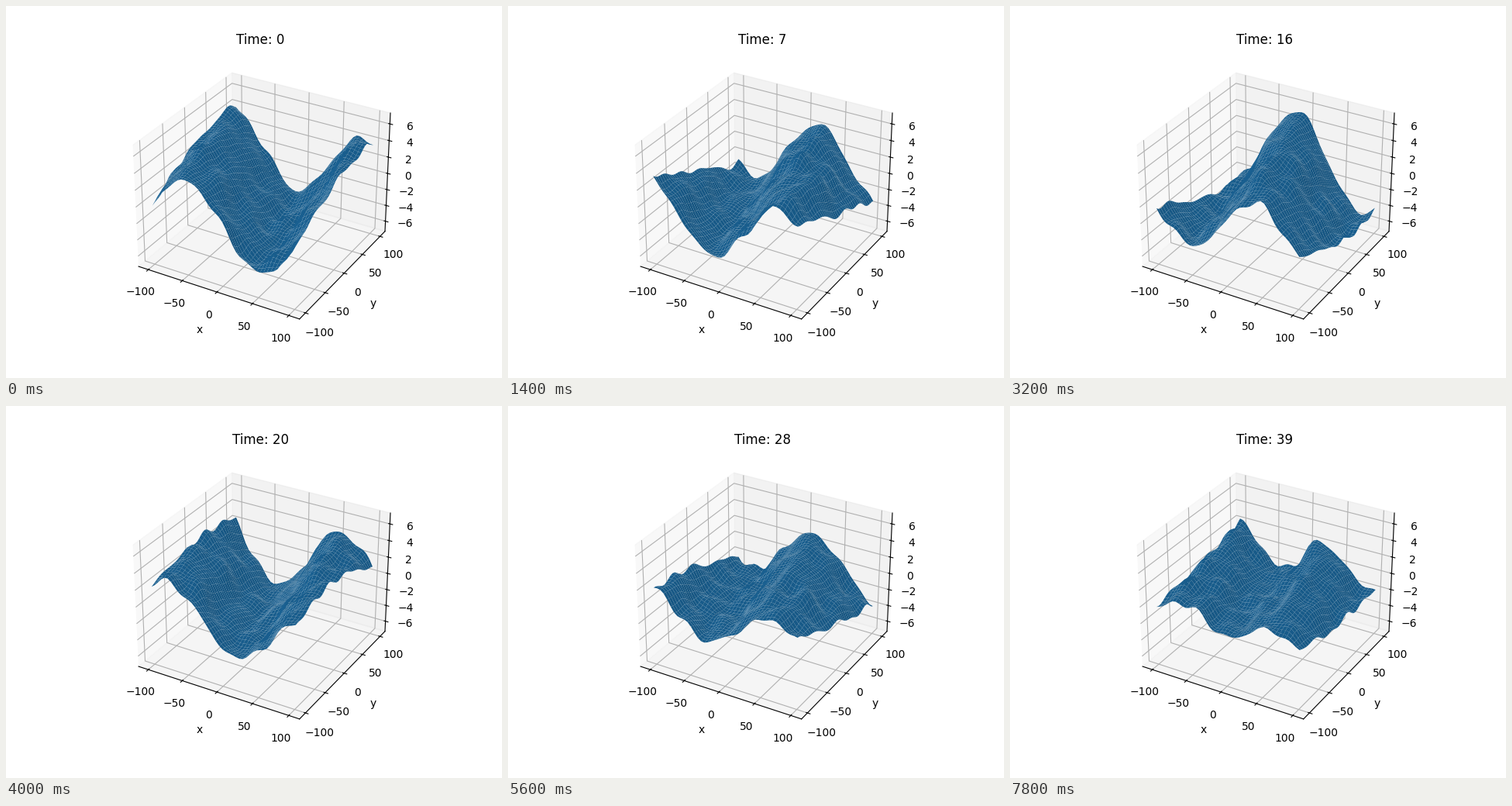
A matplotlib script for the animation above (8 s loop, 640 px wide and 480 px high).

```python
import numpy as np
import matplotlib.pyplot as plt
from matplotlib.animation import FuncAnimation

FRAMES, INTERVAL = 40, 200
SIZE = 100       # half width of the sea patch
SLANT = 0.3      # phase lag of the back edge, in turns
GRAVITY = 9.81

# Main swell: time, turns at the front edge, wavelength, front and back height
SWELL = np.array([
    (0, -.25, 198, 4.1, 4.3),
    (3, .08, 195, 3.8, 4.6),
    (10, .645, 195, 4.0, 4.0),
    (16, 1.22, 190, 3.6, 5.1),
    (24, 1.985, 188, 2.9, 3.5),
    (33, 2.84, 165, 1.7, 2.6),
    (39, 3.51, 130, 1.1, 2.2),
])

side = np.linspace(-SIZE, SIZE, 43)
X, Y = np.meshgrid(side, side)
DEPTH = (Y + SIZE) / (2 * SIZE)  # 0 at the front edge, 1 at the back

# Short waves: wave number, heading and phase
rng = np.random.default_rng(4)
ripples = list(zip(rng.uniform(.08, .2, 16),
                   rng.normal(.3, .6, 16),
                   rng.uniform(0, 2 * np.pi, 16)))


def swell(t):
    turns, length, front, back = (
        np.interp(t, SWELL[:, 0], col) for col in SWELL.T[1:])
    height = front + (back - front) * DEPTH
    return height * np.cos(2 * np.pi * (X / length - turns + SLANT * DEPTH))


def ripple(t, k, heading, phase):
    along = X * np.cos(heading) + Y * np.sin(heading)
    return .1 * np.cos(k * along - np.sqrt(GRAVITY * k) * t + phase)


def sea(t):
    return swell(t) + sum(ripple(t, *r) for r in ripples)


fig = plt.figure(figsize=(6.4, 4.8), dpi=100)
ax = fig.add_subplot(projection="3d")
ax.set_xlim(-114.58, 114.58)
ax.set_ylim(-114.58, 114.58)
ax.set_zlim(-7.29, 7.29)
ax.set_xlabel("x")
ax.set_ylabel("y")


def update(t):
    for surface in list(ax.collections):
        surface.remove()
    ax.plot_surface(X, Y, sea(t), color="C0", rstride=1, cstride=1)
    ax.set_title(f"Time: {t}")


anim = FuncAnimation(fig, update, frames=FRAMES, interval=INTERVAL,
                     repeat=True, repeat_delay=0)
plt.show()
```
